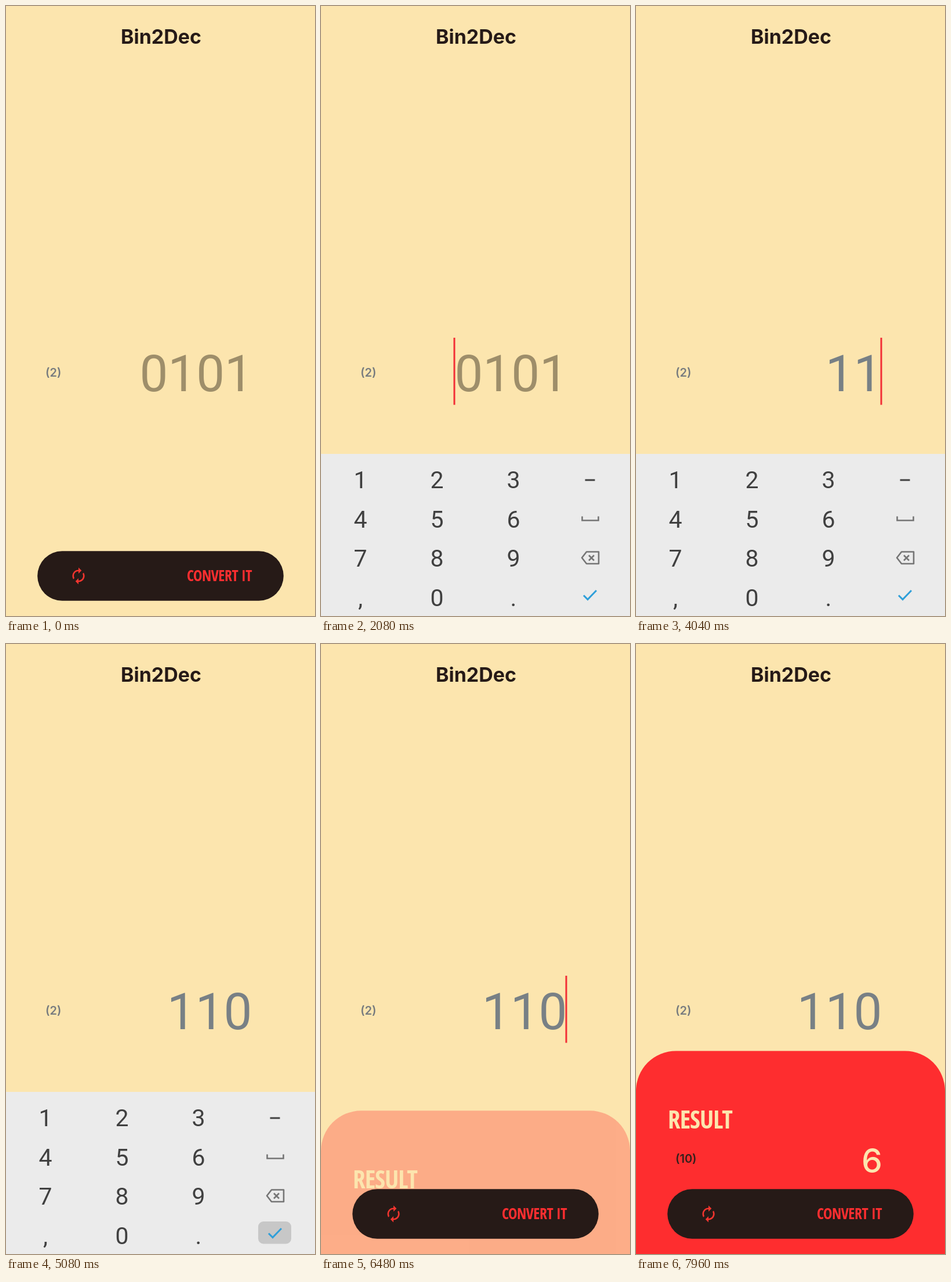
An HTML page for the animation above (8000 ms loop, 533 px wide and 1050 px high).

```html
<!DOCTYPE html>
<html lang="en">
<head>
<meta charset="utf-8">
<title>Bin2Dec</title>
<style>
  html, body { margin: 0; width: 100%; height: 100%; overflow: hidden; background: #fce5ae; }
  svg { display: block; width: 100%; height: 100%; }
  .ui { font-family: Inter, sans-serif; font-weight: 600; }
  .digits { font: 87px Roboto, sans-serif; }
  .narrow {
    font-family: "Open Sans Condensed", "Open Sans", sans-serif;
    font-stretch: 75%; font-weight: 500; letter-spacing: -.02em;
  }
  .key { font: 41px Roboto, sans-serif; fill: #404040; text-anchor: middle; }
  .end { text-anchor: end; }
  .icon { fill: none; stroke: #757575; stroke-width: 2.6; }
</style>
</head>
<body>
<svg viewBox="0 0 533 1050" preserveAspectRatio="none">
  <rect width="533" height="1050" fill="#fce5ae"/>
  <text class="ui" x="267.5" y="65" font-size="34" text-anchor="middle" fill="#261a17" style="font-weight:700">Bin2Dec</text>
  <text class="ui" x="68" y="637.5" font-size="20" fill="#777b7e">(2)</text>
  <text class="digits end" id="value" y="663"></text>
  <rect id="cursor" y="571" width="3" height="115.5" fill="#f22f36"/>

  <g id="sheet">
    <rect y="700.4" width="533" height="600" rx="69" fill="#fe2d2f"/>
    <text class="narrow" x="55" y="834" font-size="43" fill="#fce5ae">RESULT</text>
    <text class="ui" x="68" y="893" font-size="20" fill="#33201c">(10)</text>
    <text class="ui end" x="425" y="909.5" font-size="57" fill="#fce5ae" style="font-weight:500">6</text>
  </g>

  <rect x="54.2" y="938.3" width="424.6" height="85.4" rx="42.7" fill="#261a17"/>
  <path transform="translate(109.2 965.2) scale(1.32)" fill="#f5352f"
    d="M12 6v3l4-4-4-4v3c-4.42 0-8 3.58-8 8 0 1.57.46 3.03 1.24 4.26L6.7 14.8c-.45-.83-.7-1.79-.7-2.8 0-3.31 2.69-6 6-6zm6.76 1.74L17.3 9.2c.44.84.7 1.79.7 2.8 0 3.31-2.69 6-6 6v-3l-4 4 4 4v-3c4.42 0 8-3.58 8-8 0-1.57-.46-3.03-1.24-4.26z"/>
  <text class="narrow end" x="424" y="990" font-size="26" fill="#ff2e30">CONVERT IT</text>

  <g id="keyboard">
    <rect y="771" width="533" height="279" fill="#ebebeb"/>
    <rect id="press" rx="9" fill="#c7c7c7"/>
    <g id="keys"></g>
    <path class="icon" d="M455.5 816h17" style="stroke:#404040;stroke-width:3"/>
    <path class="icon" d="M450.5 878.5v7h28v-7"/>
    <path class="icon" stroke-linejoin="round" d="M458 939.5h21v20.5h-21l-8-10.2z"/>
    <path class="icon" d="M462 945.5l9 9m0-9l-9 9"/>
    <path class="icon" d="M453 1014.5l7 7 15-15.5" style="stroke:#2f9fd9;stroke-width:3"/>
  </g>
</svg>
<script>
const LOOP = 8000;
const KEYBOARD_HEIGHT = 279;
const SHEET_RISE = 147;
const $ = id => document.getElementById(id);

const entries = [
  { at: 0, text: '' },
  { at: 2920, text: '1' },
  { at: 3640, text: '11' },
  { at: 4520, text: '110' }
];
const digitKey = (col, row) => [3 + 132 * col, 783 + 67.6 * row, 130, 66];
const presses = [
  { from: 2760, to: 2920, box: digitKey(0, 0) },
  { from: 3480, to: 3640, box: digitKey(0, 0) },
  { from: 4360, to: 4520, box: digitKey(1, 3) },
  { from: 5040, to: 5240, box: [435, 994, 57, 38.5] }
];
// Each of these moments turns the cursor on and restarts its blinking.
const blinkStarts = [1240, 1740, 2920, 3640, 4520, 5240];

$('keys').innerHTML = [...'123456789,0.'].map((char, i) =>
  `<text class="key" x="${68 + i % 3 * 132}" y="${830 + Math.floor(i / 3) * 67.6}">${char}</text>`).join('');

const progress = (t, start, duration) => Math.min(1, Math.max(0, (t - start) / duration));
const smooth = p => (1 - Math.cos(Math.PI * p)) / 2;
const setAttrs = (el, attrs) => {
  for (const name in attrs) el.setAttribute(name, attrs[name]);
};
const show = (el, on) => el.setAttribute('visibility', on ? 'visible' : 'hidden');

function render(t) {
  const { text } = entries.findLast(e => t >= e.at);
  $('value').textContent = text || '0101';
  setAttrs($('value'), { x: text ? 424.5 : 426, fill: text ? '#788085' : '#9e8e6a' });

  const blinkStart = blinkStarts.findLast(start => t >= start);
  $('cursor').setAttribute('x', text ? 421.5 : 228.5);
  show($('cursor'), blinkStart !== undefined && (t - blinkStart) % 1000 < 500);

  const rise = 1 - (1 - progress(t, 1769, 285)) ** 2;
  const fall = progress(t, 5280, 250) ** 2;
  $('keyboard').setAttribute('transform', `translate(0 ${KEYBOARD_HEIGHT * (1 - rise + fall)})`);

  const press = presses.find(p => t >= p.from && t < p.to);
  show($('press'), press);
  if (press) {
    const [x, y, width, height] = press.box;
    setAttrs($('press'), { x, y, width, height });
  }

  const reveal = smooth(progress(t, 6350, 355));
  setAttrs($('sheet'), { opacity: reveal, transform: `translate(0 ${SHEET_RISE * (1 - reveal)})` });
}

function tick() {
  render(performance.now() % LOOP);
  requestAnimationFrame(tick);
}
tick();
</script>
</body>
</html>
```
